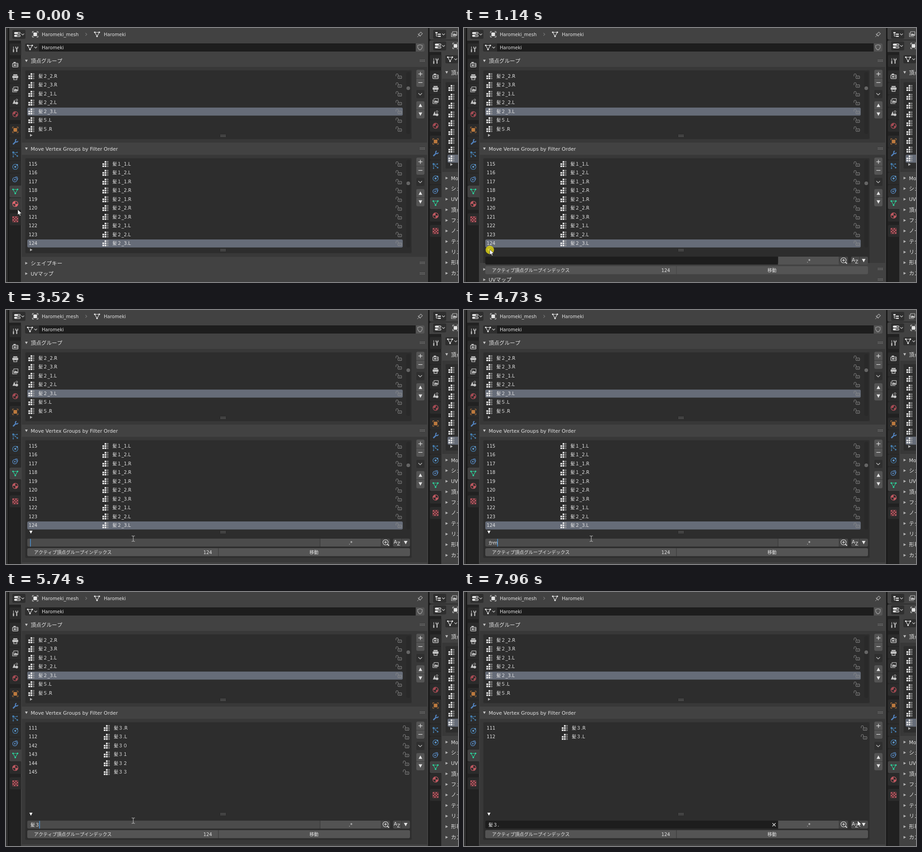
These frames come from a looping animation (998 by 561 pixels, 7990 ms). An HTML page with a canvas:

```html
<!DOCTYPE html>
<html lang="ja">
<head>
<meta charset="utf-8">
<title>Vertex group filter</title>
<style>
html, body { margin: 0; width: 100%; height: 100%; overflow: hidden; background: #191919; }
canvas { display: block; width: 998px; height: 561px; }
</style>
</head>
<body>
<canvas id="stage" width="998" height="561"></canvas>
<script>
const c = document.getElementById('stage').getContext('2d');
const LOOP = 7990, ROW = 19.45;
const LIGHT = '#e4e4e4', DIM = '#8d8d8d', BACK = '#424242', BODY = '#383838', LIST = '#2d2d2d', BUTTON = '#545454';
const WIDGET = [10.1, 10.1], TITLE = [10.95, 11.65];
const NAME = 'Haromeki';

// ---------- primitives ----------
function box(x, y, w, h, col, r = 0) {
  c.fillStyle = col;
  c.beginPath();
  c.roundRect(x, y, w, h, r);
  c.fill();
}
function frame(x, y, w, h, col, r = 0, lw = 1) {
  c.strokeStyle = col;
  c.lineWidth = lw;
  c.beginPath();
  c.roundRect(x, y, w, h, r);
  c.stroke();
}
function disc(x, y, r, col) {
  c.fillStyle = col;
  c.beginPath();
  c.arc(x, y, r, 0, 7);
  c.fill();
}
function ring(x, y, r, col, lw = 1.2) {
  c.strokeStyle = col;
  c.lineWidth = lw;
  c.beginPath();
  c.arc(x, y, r, 0, 7);
  c.stroke();
}
function trace(pts, closed) {
  c.beginPath();
  for (let i = 0; i < pts.length; i += 2) c.lineTo(pts[i], pts[i + 1]);
  if (closed) c.closePath();
}
function line(pts, col, lw = 1.2, closed = false) {
  trace(pts, closed);
  c.strokeStyle = col;
  c.lineWidth = lw;
  c.stroke();
}
function poly(pts, col) {
  trace(pts, true);
  c.fillStyle = col;
  c.fill();
}
function at(x, y, draw, ...args) {
  c.save();
  c.translate(x, y);
  draw(...args);
  c.restore();
}

// Latin and Japanese runs have their own sizes; returns the end x.
function text(s, x, y, size = WIDGET, col = LIGHT, align = 0) {
  const runs = s.match(/[\x00-\x7f]+|[^\x00-\x7f]+/g) || [];
  const font = r => r.charCodeAt(0) < 128
    ? size[0] + 'px "DejaVu Sans", sans-serif'
    : size[1] + 'px "Noto Sans CJK JP", "Noto Sans CJK", sans-serif';
  const widths = runs.map(r => { c.font = font(r); return c.measureText(r).width; });
  x -= align * widths.reduce((a, b) => a + b, 0);
  c.fillStyle = col;
  runs.forEach((r, i) => {
    c.font = font(r);
    c.fillText(r, x, y + 4);
    x += widths[i];
  });
  return x;
}

// ---------- small marks ----------
const right = (x, y, col = '#b4b4b4') => poly([x - 2.5, y - 3, x + 3, y, x - 2.5, y + 3], col);
const down = (x, y, col = '#c4c4c4', s = 3) => poly([x - s, y - s * .85, x + s, y - s * .85, x, y + s], col);
const up = (x, y, col, s) => poly([x - s, y + s * .85, x + s, y + s * .85, x, y - s], col);
const chevron = (x, y, s = 3, col = '#c8c8c8') => line([x - s, y - s / 2, x, y + s / 2, x + s, y - s / 2], col, 1.2);
function grip(x, y, col = '#a0a0a0') {
  for (let i = 0; i < 4; i++)
    for (let j = 0; j < 2; j++) box(x - 5 + i * 3, y - 2 + j * 3, 1.3, 1.3, col);
}

// ---------- icons, all centred on 0,0 ----------
function groupIcon() {
  for (const y of [-4.8, 0, 4.8]) {
    if (y >= 0) box(-6.6, y - 1.7, 3.8, 3.4, '#ececec');
    box(-1.7, y - 1.8, 3.6, 3.6, '#ececec');
    frame(3.7, y - 1.2, 2.4, 2.4, '#a8a8a8', 0, .9);
  }
}
function lockIcon() {
  frame(-1.5, -.5, 8, 5.5, DIM, .5);
  c.beginPath();
  c.moveTo(-6, 0);
  c.lineTo(-6, -2.5);
  c.arc(-3.5, -2.8, 2.5, Math.PI, 0);
  c.lineTo(-1, -.5);
  c.stroke();
  box(2, 1.5, 1.2, 2, DIM);
}
function meshIcon(col = LIGHT) {
  line([-5, -4.5, 5, -4.5, 0, 4.5], col, 1.1, true);
  for (const [x, y] of [[-5, -4.5], [5, -4.5], [0, 4.5]]) disc(x, y, 1.8, col);
}
function objectIcon(col = LIGHT) {
  box(-4, -4, 8, 8, col);
  for (const x of [-1, 1])
    for (const y of [-1, 1]) line([x * 6.2, y * 3, x * 6.2, y * 6.2, x * 3, y * 6.2], col, 1);
}
function slidersIcon() {
  box(-7, -5, 14, 4.4, LIGHT, 2);
  box(-7, 1, 14, 4.4, LIGHT, 2);
  box(1, -3.8, 5, 2, '#333', 1);
  box(-1, 2.2, 7, 2, '#333', 1);
}
function treeIcon() {
  box(-6, -5, 5, 2.5, LIGHT);
  line([-4, -3, -4, 4, 0, 4], LIGHT, 1);
  line([-4, 0, 0, 0], LIGHT, 1);
  box(0, -1.5, 6, 2.5, LIGHT);
  box(0, 3, 6, 2.5, LIGHT);
}
function toolIcon() {
  const g = '#bcbcbc';
  line([-4, -6, -4, 0], g, 1.2);
  box(-5.3, 0, 2.6, 6.5, g, 1);
  line([1, -6, 1, -2.5, 5.5, -2.5, 5.5, -6], g, 1.6);
  line([3.2, -2, 3.2, 6], g, 2.4);
}
function renderIcon() {
  const g = '#c4c4c4';
  frame(-6, -3, 12, 8, g, 1, 1.5);
  box(-4, -6, 5, 2.5, g);
  box(-3.5, -.5, 5, 3.2, g);
  box(3, -1, 1.5, 4, g);
}
function printIcon() {
  const g = '#c4c4c4';
  box(-4.5, -6, 9, 2.5, g);
  box(-6.5, -2.8, 13, 5, g, 1);
  frame(-3.5, 1.5, 7, 4.5, g, 0, 1.3);
}
function imageIcon(col = '#c4c4c4') {
  line([-6, -3, -6, 5.5, 4, 5.5], col, 1.2);
  frame(-3.5, -5.5, 9.5, 8.5, col, .5, 1.2);
  poly([-3, 2.5, 0, -2, 2, .5, 3.5, -1, 5.5, 2.5], col);
}
function sceneIcon() {
  const g = '#c4c4c4';
  poly([-6, 4.5, -2, -5, 1, 4.5], g);
  disc(3.2, 2.8, 3, g);
  ring(3.2, -4, 2, g, 1);
}
function worldIcon() {
  const r = '#a84c55';
  ring(0, 0, 5.8, r, 1.4);
  poly([-4, -4, 1, -5.5, 0, -1, -3, 1, -5, 0], r);
  poly([1, 1, 5, -1, 4, 4, 1, 5], r);
}
function wrenchIcon() {
  const b = '#5281bb';
  line([-5, 5, 2, -2], b, 3);
  c.strokeStyle = b;
  c.lineWidth = 2.2;
  c.beginPath();
  c.arc(3, -3, 2.8, .1, 4.6);
  c.stroke();
}
function particleIcon() {
  const b = '#467fb0';
  line([-4.5, 5, -4.5, -4, 4.5, 3], b, 1);
  line([-4.5, -4, 4, -4], b, 1);
  for (const [x, y, r] of [[-4.5, -4.5, 2.3], [4, -4.5, 1.4], [4.5, 3.5, 1.8], [-4.5, 5, 1.4], [0, 0, 1.4]]) disc(x, y, r, b);
}
function physicsIcon() {
  const b = '#467fb0';
  ring(0, 0, 5.8, b, 1.3);
  disc(0, 0, 2.2, '#5f95c6');
  disc(4.2, -4.2, 1.8, '#5f95c6');
}
function constraintIcon() {
  const b = '#5584ba';
  ring(-1, 1, 4.8, b, 1.5);
  disc(-1, 1, 1.8, b);
  line([0, -5, 4, -5, 5.5, -1, 3.5, 3], b, 1.3);
}
function materialIcon(col) {
  ring(0, 0, 6, col, 1.2);
  c.fillStyle = col;
  for (const a of [Math.PI, 0]) {
    c.beginPath();
    c.moveTo(0, 0);
    c.arc(0, 0, 6, a, a + Math.PI / 2);
    c.fill();
  }
}
function textureIcon() {
  box(-6.5, -6.5, 13, 13, '#b0565f', 1);
  for (let i = 0; i < 16; i++)
    if ((i + (i >> 2)) % 2) box(-5.8 + (i % 4) * 3, -5.8 + (i >> 2) * 3, 2.7, 2.7, '#3a2426');
}
const TABS = [
  [47, toolIcon], [81, renderIcon], [108.3, printIcon], [135.6, imageIcon], [163, sceneIcon], [190.3, worldIcon],
  [225, objectIcon, '#bd7a3e'], [252, wrenchIcon], [279.3, particleIcon], [306.6, physicsIcon],
  [334, constraintIcon], [361, meshIcon, '#2bd49b'], [388.5, materialIcon, '#bd5860'], [422.5, textureIcon]
];

// ---------- editor parts ----------
function tabs(x, dy, hover) {
  for (const [y, icon, col] of TABS) {
    const lit = hover && icon === materialIcon;
    const fill = icon === meshIcon ? BACK : lit ? '#3c3c3c' : '#2b2b2b';
    box(x - 12.5, y + dy - 13.3, 25.5, 26.6, fill, [3, 0, 0, 3]);
    at(x, y + dy, icon, lit ? '#e0666f' : col);
  }
}
function editorButton(x, y, icon) {
  box(x, y, 29, 20, '#2f2f2f', 3);
  at(x + 11, y + 10, icon);
  chevron(x + 23, y + 10);
}
function listRow(y, name, num, opt) {
  const { wide = false, active = false } = opt;
  if (active) box(47, y - 8.1, 829, 17.8, '#666c78', 3);
  const ix = num ? (wide ? 222.5 : 219.5) : 56;
  if (num) text('' + num, 50, y);
  at(ix, y + .5, groupIcon);
  text('髪' + name, ix + 15.5, y);
  at(wide ? 883 : 867, y + .5, lockIcon);
}
function sideButtons(y) {
  for (const [dy, r] of [[0, [3, 3, 0, 0]], [19.4, [0, 0, 3, 3]], [69.5, [3, 3, 0, 0]], [89, [0, 0, 3, 3]]])
    box(906, y + dy - 8.7, 18, 18.4, BUTTON, r);
  box(906, y + 36, 18, 18, '#2f2f2f', 3);
  line([910.5, y + .5, 919.5, y + .5], LIGHT, 1.2);
  line([915, y - 4, 915, y + 5], LIGHT, 1.2);
  line([910.5, y + 19.5, 919.5, y + 19.5], LIGHT, 1.2);
  chevron(914.5, y + 45, 4);
  up(915, y + 70, LIGHT, 4);
  down(915, y + 89, LIGHT, 4);
}
function scrollbar(y, h, from, len) {
  box(884, y, 8.5, h, '#292929', 4);
  box(884.2, from, 8, len, '#666', 4);
}
function panelTitle(label, y, open, x = 45) {
  open ? down(x, y - .5) : right(x, y);
  text(label, x + 9.5, y, TITLE);
}
function listBox(x, y, w, h) {
  box(x, y, w, h, LIST, 4);
  frame(x + .5, y + .5, w - 1, h - 1, '#343434', 4);
}

// ---------- state ----------
const HAIR = ('１_1.L １_2.L １_1.R １_2.R ２_1.R ２_2.R ２_3.R ２_1.L ２_2.L ２_3.L ' +
  '５.L ５.R ６.L ６.R ７.L ７.R ８.L ８.R ２１').split(' ');
const TYPED = [[0, ''], [4450, 'k'], [4620, 'か'], [4730, 'かｍ'], [4940, 'かみ'], [5120, '髪'], [5550, '髪３'], [6790, '髪３.']];
const PATH = [[440, 26, 401], [760, 57, 489], [1480, 57, 489], [1600, 170, 527], [1730, 269, 520], [3380, 269, 520],
  [3520, 281, 505], [7150, 281, 505], [7500, 520, 458], [7920, 865, 479], [7960, 869, 505]];
const OPENS = 1125;
const typed = t => TYPED.filter(k => t >= k[0]).pop()[1];
const between = (t, a, b) => t >= a && t < b;

function pointer(t) {
  const i = PATH.findIndex(p => p[0] > t);
  if (i === 0) return PATH[0].slice(1);
  if (i < 0) return PATH[PATH.length - 1].slice(1);
  const [a, x, y] = PATH[i - 1], [b, u, v] = PATH[i];
  const k = (t - a) / (b - a);
  return [x + (u - x) * k, y + (v - y) * k];
}
function listRows(t) {
  if (t >= 5740) {
    const rows = [[111, '３.R'], [112, '３.L']];
    if (t < 6790) [...'０１２３'].forEach((d, i) => rows.push([142 + i, '３' + d]));
    return rows;
  }
  const first = t < 5320 ? 115 : 124;
  return HAIR.slice(first - 115, first - 105).map((n, i) => [first + i, n]);
}

// ---------- scene ----------
function filterRows(t) {
  const editing = between(t, 3170, 7150);
  box(47, 505, 646, 17.6, editing ? '#4b4b4b' : '#1d1d1d', [3, 0, 0, 3]);
  const end = text(typed(t), 54, 513.5, WIDGET, '#f2f2f2');
  if (editing) box(end - .8, 505.5, 1.6, 17, '#4a90d0');
  if (t >= 7150) {
    line([681, 510.5, 688, 517.5], LIGHT, 1.3);
    line([688, 510.5, 681, 517.5], LIGHT, 1.3);
  }
  box(693.8, 505, 134, 17.6, '#535353');
  text('.*', 761, 513.5, WIDGET, LIGHT, .5);
  box(828.5, 505, 19.5, 17.6, '#464646', [0, 3, 3, 0]);
  ring(838, 513, 5.8, LIGHT, 1.1);
  line([842, 517, 845.5, 520.5], LIGHT, 1.8);
  line([835, 513, 841, 513], LIGHT, 1.2);
  line([838, 510, 838, 516], LIGHT, 1.2);
  box(854.5, 505, 18.7, 17.6, '#4a4a4a', [3, 0, 0, 3]);
  box(873.8, 505, 18.2, 17.6, '#4a4a4a', [0, 3, 3, 0]);
  text('A', 856, 512, [11, 11]);
  text('Z', 863.5, 516, [10, 10]);
  down(882.5, 513.5, LIGHT, 4);

  box(47, 526, 421.6, 17.8, between(t, 1570, 1690) ? '#606060' : BUTTON, [3, 0, 0, 3]);
  box(469.4, 526, 422.6, 17.8, BUTTON, [0, 3, 3, 0]);
  text('アクティブ頂点グループインデックス', 61.8, 534.5);
  text('124', 455, 534.5, WIDGET, LIGHT, 1);
  text('移動', 680, 534.5, WIDGET, LIGHT, .5);
}

function mainEditor(t) {
  const open = t >= OPENS;
  const shift = open ? 52 * Math.sqrt(Math.min((t - OPENS) / 240, 1)) : 0;
  box(7, 0, 925, 561, '#212121');
  box(7, 0, 925, 28, BACK);
  box(33, 28, 899, 533, BACK);
  tabs(20.5, 0, t < 520);

  editorButton(14, 4, slidersIcon);
  at(64.5, 14, objectIcon);
  text(NAME + '_mesh', 79, 14);
  line([175.5, 11, 178.5, 14, 175.5, 17], '#777', 1.2);
  at(201, 14, meshIcon);
  text(NAME, 216, 14);
  line([908, 20, 912, 16], '#aaa', 1);
  line([909.5, 13, 915, 18.5], '#aaa', 1.2);
  line([911, 14, 916, 9, 919.5, 12.5, 914.5, 17.5], '#aaa', 1.1, true);

  box(42, 34, 30, 18, '#2f2f2f', [3, 0, 0, 3]);
  at(53, 43, meshIcon);
  chevron(65.5, 43);
  box(72.5, 34, 832, 18, '#1d1d1d');
  text(NAME, 79, 43);
  box(905, 34, 19, 18, BUTTON, [0, 3, 3, 0]);
  line([909, 38.5, 914, 37, 919, 38.5, 919, 43, 917, 46.5, 914, 48.5, 911, 46.5, 909, 43], '#a8a8a8', 1.1, true);

  box(35, 86, 895, 167, BODY);
  panelTitle('頂点グループ', 73, true);
  grip(919, 72);
  listBox(42, 93, 854, 153);
  ['２_2.R', '２_3.R', '２_1.L', '２_2.L', '２_3.L', '５.L', '５.R'].forEach((n, i) =>
    listRow(106 + i * ROW, n, 0, { active: i === 4 }));
  right(55.5, 237);
  grip(479, 238);
  scrollbar(97, 137, 129, 8);
  sideButtons(101);

  box(35, 280, 895, 281, BODY);
  panelTitle('Move Vertex Groups by Filter Order', 267, true);
  grip(919, 266);
  listBox(42, 287, 854, open ? 261 : 211);
  const wide = t >= 5740;
  listRows(t).forEach(([num, name], i) =>
    listRow(300 + i * ROW, name, num, { wide, active: num === 124 }));
  if (!wide) t < 5320 ? scrollbar(291, 194, 339, 8) : scrollbar(291, 194, 330.5, 19.5);
  grip(479, 490.5);
  sideButtons(295);

  // The closed panels slide down over the list, below its filter row.
  box(33, 505.5 + shift, 899, 60, BACK);
  panelTitle('シェイプキー', 519.5 + shift, false);
  grip(919, 518.5 + shift);
  panelTitle('UVマップ', 542.5 + shift, false);
  grip(919, 542 + shift);
  if (open) filterRows(t);
}

function sideEditor() {
  box(935, 0, 63, 26, BACK, [0, 0, 0, 4]);
  editorButton(943, 4, treeIcon);
  at(989.5, 13.5, imageIcon);
  box(935, 27, 63, 534, '#212121', [4, 0, 0, 0]);
  box(935, 27, 63, 26, BACK, [4, 0, 0, 0]);
  editorButton(943, 29.5, slidersIcon);
  at(992.5, 39.5, objectIcon);
  box(961, 53, 37, 508, BACK);
  tabs(948.5, 25.7, false);
  box(970, 60, 28, 18, '#2f2f2f', 3);
  at(980.5, 69, meshIcon);
  chevron(993, 69);
  box(963, 112, 35, 206, BODY);
  panelTitle('頂点グループ', 98.5, true, 973);
  listBox(970, 119, 40, 192);
  box(975, 279.8, 30, 17.8, '#666c78', 3);
  for (let i = 0; i < 9; i++) at(983.5, 132.5 + i * ROW, groupIcon);
  right(983.5, 301.5);
  ['Move', 'シェイプ', 'UV', '頂点', 'フェイス', 'ノーマル', 'テクスチャ', 'リメッシュ', '形状', 'カスタム'].forEach((s, i) =>
    panelTitle(s, 331.5 + i * 23.35, false, 973));
}

function pointerMark(t) {
  const [x, y] = pointer(t);
  t < OPENS ? right(55.5, 490) : down(55, 490.5, '#fff', 3.5);
  if (between(t, 1020, 1260) || between(t, 3150, 3240)) disc(x, y + 1, 9.3, 'rgba(215,205,20,.86)');
  if (between(t, 1730, 3150)) return;
  if (between(t, 3150, 7150)) {
    line([x - 3.5, y - 6, x - 1, y - 6, x, y - 5, x + 1, y - 6, x + 3.5, y - 6], '#ccc', 1);
    line([x - 3.5, y + 6, x - 1, y + 6, x, y + 5, x + 1, y + 6, x + 3.5, y + 6], '#ccc', 1);
    line([x, y - 5, x, y + 5], '#ccc', 1);
    return;
  }
  const arrow = [0, 0, 0, 12, 2.7, 9.6, 4.7, 14, 6.6, 13.2, 4.7, 9, 8.4, 8.6];
  const pts = arrow.map((v, i) => v + (i % 2 ? y : x));
  poly(pts, '#fff');
  line(pts, '#222', .7, true);
}

function draw(t) {
  box(0, 0, 998, 561, '#191919');
  box(0, 0, 4, 561, '#303030');
  mainEditor(t);
  sideEditor();
  pointerMark(t);
}

const start = performance.now();
function tick() {
  draw((performance.now() - start) % LOOP);
  requestAnimationFrame(tick);
}
tick();
</script>
</body>
</html>
```
